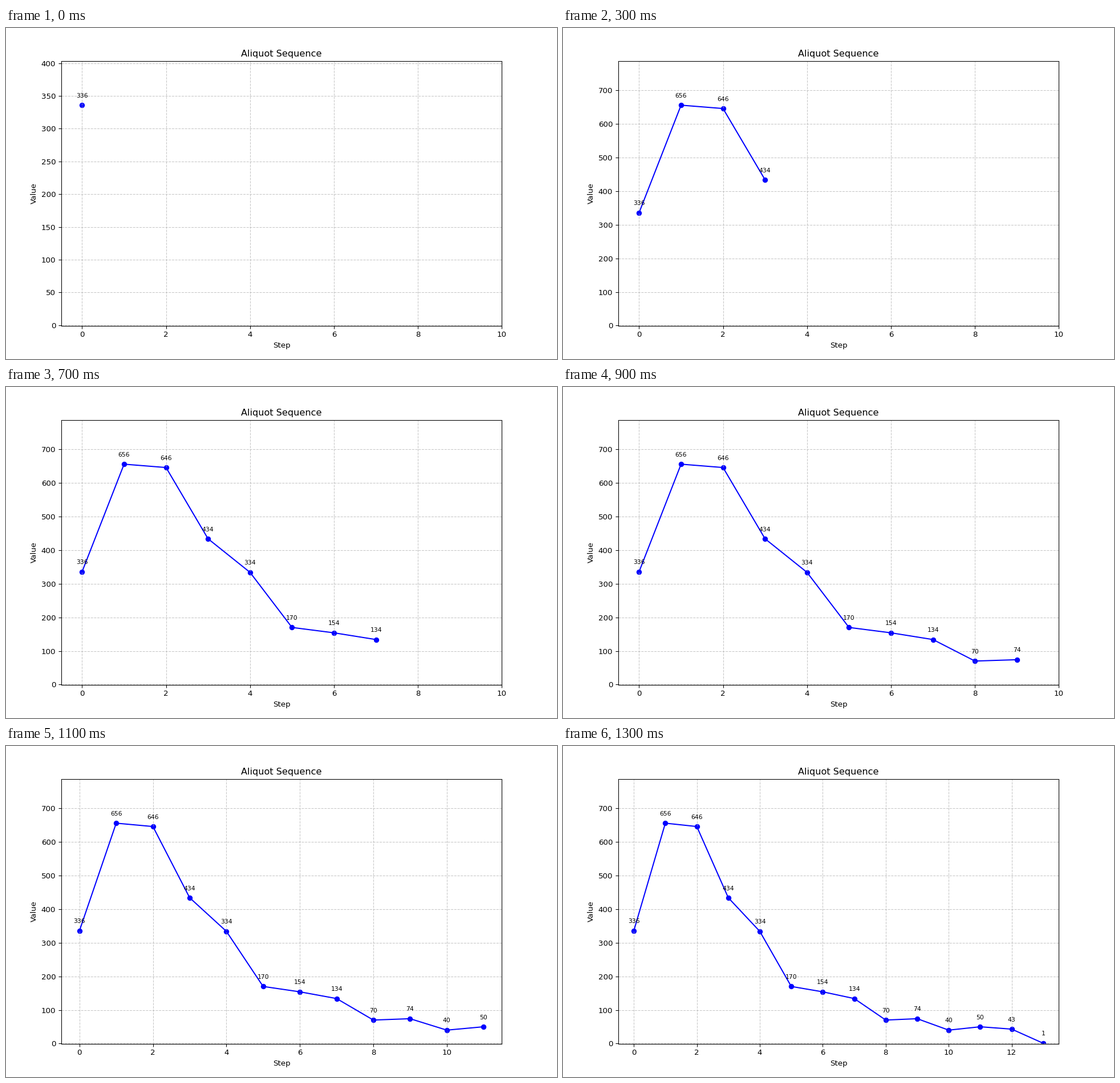
A matplotlib script for the animation above (1.4 s loop, 966 by 580 pixels).

```python
import matplotlib.pyplot as plt
from matplotlib.animation import FuncAnimation

START = 336
INTERVAL = 100
WIDTH, HEIGHT, DPI = 966, 580, 96.6


def aliquot_sum(n):
    return sum(d for d in range(1, n // 2 + 1) if n % d == 0)


def aliquot_sequence(n):
    values = [n]
    while values[-1] > 1:
        values.append(aliquot_sum(values[-1]))
    return values


SEQUENCE = aliquot_sequence(START)

plt.rcParams["font.family"] = "DejaVu Sans"
# A hair over the exact size keeps rounding from dropping a pixel.
fig, ax = plt.subplots(figsize=((WIDTH + 0.01) / DPI, (HEIGHT + 0.01) / DPI), dpi=DPI)
fig.subplots_adjust(left=0.1, right=0.9, bottom=0.1, top=0.9)


def draw(frame):
    values = SEQUENCE[:frame + 1]
    steps = range(len(values))

    ax.clear()
    ax.set_title("Aliquot Sequence")
    ax.set_xlabel("Step")
    ax.set_ylabel("Value")
    ax.grid(True, linestyle="--", alpha=0.7)

    # Scatter sits below the grid, the line above it.
    ax.scatter(steps, values, color="blue")
    ax.plot(steps, values, color="blue")
    for step, value in zip(steps, values):
        ax.annotate(str(value), (step, value), xytext=(0, 10),
                    textcoords="offset points", ha="center", fontsize=8)

    ax.set_xlim(-0.5, max(10, frame + 0.5))
    ax.set_ylim(-1, max(values) * 1.2)


anim = FuncAnimation(fig, draw, frames=len(SEQUENCE), init_func=lambda: draw(0),
                     interval=INTERVAL, repeat=True, repeat_delay=0)

plt.show()
```
